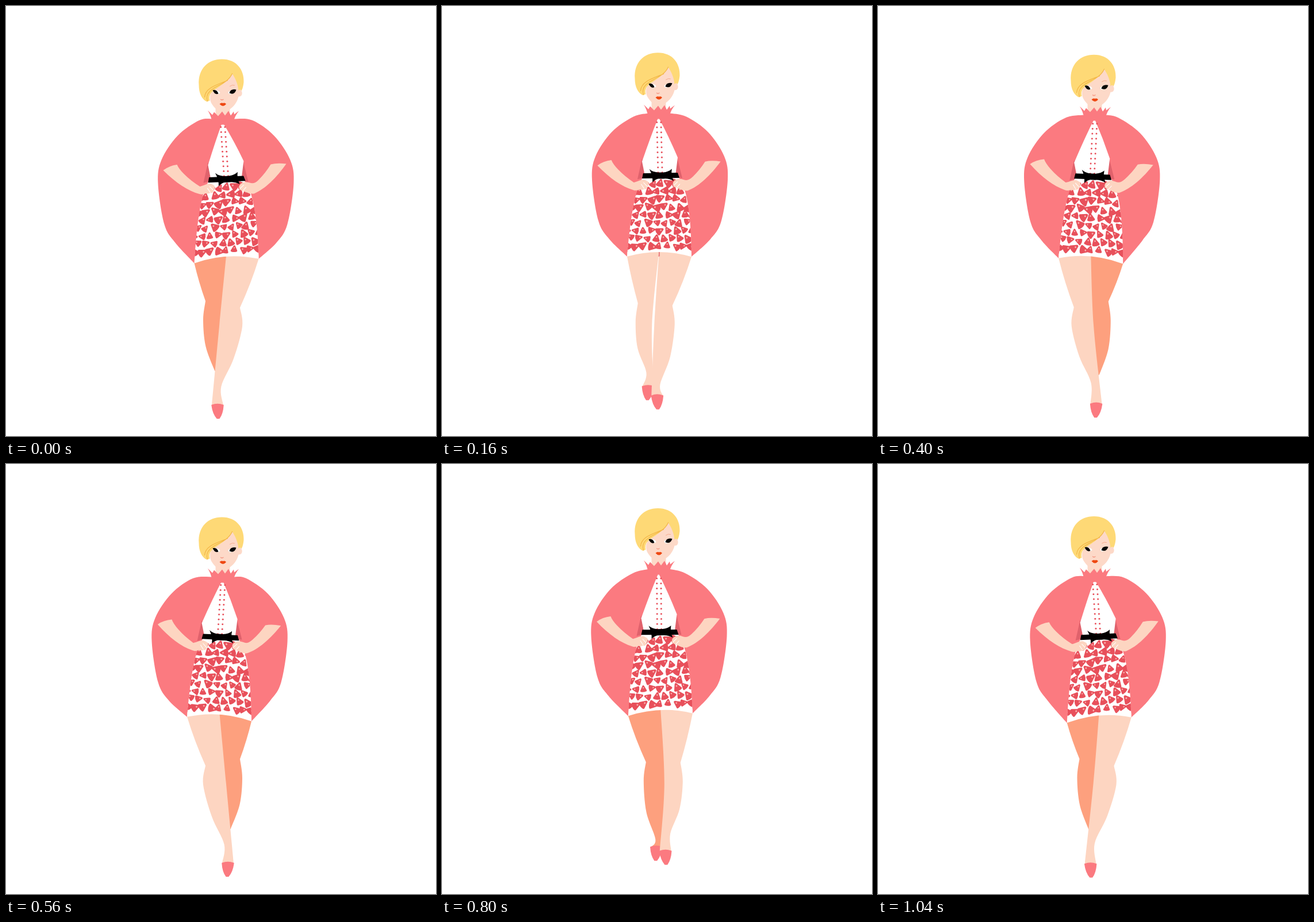
Recreate the animation shown at these times as an HTML page with a canvas. Size 748x748 px, loop 1120 ms.

```html
<!DOCTYPE html>
<html lang="en">
<head>
<meta charset="utf-8">
<title>Catwalk</title>
<style>
html, body { margin: 0; width: 100%; height: 100%; overflow: hidden; background: #fff; }
canvas { display: block; width: 748px; height: 748px; }
</style>
</head>
<body>
<canvas id="stage" width="748" height="748"></canvas>
<script>
const c = document.getElementById('stage').getContext('2d');
const STEP = 80, COUNT = 14, HALF = COUNT / 2;
const AXIS = 377; // the two legs mirror each other about this line, half a cycle apart
const PINK = '#fb7a80', SHADE = '#e0626c', RED = '#e8505b', SKIN = '#fdd5c1',
  DARK = '#fda07e', FACE = '#fdd9c8', HAIR = '#fed976', STRAND = '#f3b648';

const HEAD = {
  hair: new Path2D('M336 138C334 110 352 93 376 93C402 93 415 112 414 133C413 142 411 148 408 150L394 152L357 152Q353 158 355 165L350 167C341 163 336 152 336 138Z'),
  face: new Path2D('M394 118C387 134 368 141 358 151C354 156 355 164 358 170C363 178 370 185 378 185C390 183 402 172 405 158C410 159 413 153 410 148C409 145 406 146 405 148C404 135 399 126 394 118Z'),
  neck: new Path2D('M365 172H390V197H365Z'),
  strands: new Path2D('M394 118C386 136 365 138 355 149C350 154 349 160 351 166M386 130C366 138 347 143 346 159'),
  whites: new Path2D('M366 147Q373 148 373 152L369 154ZM387 150L393 147L392 154Q387 154 387 150Z'),
  eyes: new Path2D('M360 147Q367 145 370 153Q364 156 360 147ZM389 152Q391 144 401 146Q398 156 389 152Z'),
  brow: new Path2D('M390 140Q394 137 398 138.5'),
  nose: new Path2D('M374 163Q376 165 378.5 163'),
  lips: new Path2D('M372 171Q375 168 378 169.5Q381 168 383.5 171Q378 178 372 171Z')
};
const COLLAR = new Path2D('M-27-11L-19-3L-16-8L-9-1L-2-9L3-2L9-10L13-2L18-9L19-4L27-10Q20-1 18 8L10 14H-12L-20 8Q-21-1-27-11Z');
const BELT = new Path2D('M-30-5H30L33 4H-32Z');
const BOW = new Path2D('M-19-12Q-14-7-4-6H5Q15-7 20-12Q18-1 23 9Q14 4 5 5H-4Q-9 6-14 11Q-13 0-19-12Z');
const ARMS = new Path2D(
  'M274 286Q284 278 298 276Q301 283 310 292Q322 304 338 314C346 312 350 308 357 309L363 312Q365 316 362 320Q361 326 357 325Q352 327 348 326Q342 329 337 327C318 322 296 308 274 286Z' +
  'M488 274Q472 272 461 275Q452 290 440 302C434 308 430 309 424 307Q414 304 409 309Q404 313 407 319Q412 322 417 323Q424 327 432 326C452 318 472 297 488 274Z');
const FINGERS = new Path2D('M351 317L356 324M355 314L361 320M418 315L413 321M414 311L408 317');
// Right half of the cape, measured from the belt.
const CAPE = [[46, -103], [84, -76], [112, -34], [118, 7], [107, 78], [88, 110]];

const mix = (a, b, t) => a + (b - a) * t;
const noise = n => { const v = Math.sin(n * 12.9898) * 43758.5453; return v - Math.floor(v); };
// One sway per loop, and one bounce per footfall; peak is the step of the maximum.
const sway = (step, amp, peak) => amp * Math.cos((step - peak) / COUNT * 2 * Math.PI);
const bounce = (step, amp, peak) => amp * Math.cos((step - peak) / HALF * 2 * Math.PI);

function fill(path, color) { c.fillStyle = color; c.fill(path); }
function line(path, color, width) {
  c.strokeStyle = color; c.lineWidth = width; c.lineCap = c.lineJoin = 'round'; c.stroke(path);
}
function polygon(points, color) {
  const p = new Path2D();
  points.forEach(q => p.lineTo(...q));
  fill(p, color);
}
function disc(x, y, r, color) {
  const p = new Path2D();
  p.arc(x, y, r, 0, 7);
  fill(p, color);
}
// Smooth curve through all points, the pen being at the first.
function curve(p, pts) {
  for (let i = 0; i < pts.length - 1; i++) {
    const a = pts[Math.max(i - 1, 0)], b = pts[i], d = pts[i + 1], e = pts[Math.min(i + 2, pts.length - 1)];
    p.bezierCurveTo(b[0] + (d[0] - a[0]) / 6, b[1] + (d[1] - a[1]) / 6,
      d[0] - (e[0] - b[0]) / 6, d[1] - (e[1] - b[1]) / 6, d[0], d[1]);
  }
}
function group(draw) { c.save(); draw(); c.restore(); }

function drawCape([x, y], hemL, hemR, collar) {
  const p = new Path2D();
  const side = s => [[collar[0] + s * 17, collar[1] + 4], ...CAPE.map(([u, v]) => [x - 1 + s * u, y + v])];
  const left = [...side(-1), hemL], right = [...side(1), hemR].reverse();
  p.moveTo(...left[0]);
  curve(p, left);
  p.lineTo(...hemR);
  curve(p, right);
  fill(p, PINK);
}

// Left leg; the right one is drawn mirrored, half a cycle later.
function drawLeg(step, hip, mid, color) {
  const knee = [347 + sway(step, -8, 3.5), 519 + sway(step, 6, 6.3)];
  const shin = [368 + sway(step, 10, 8.3) + bounce(step, 4, 6.3), 648 + sway(step, 14, 7.3)];
  const toe = [368 + sway(step, 17, 7), 694 + sway(step, 26, 6.2)];
  const calf = [knee[0] - 4, knee[1] + 33];
  const low = [mix(knee[0], shin[0], .65) - 10, mix(knee[1], shin[1], .65)];
  const innerKnee = [375 + sway(step, 10, 8.5) + (color === DARK ? 12 : 0), 555];
  const lifted = sway(step, 1, 12.7) > .6;
  const outer = lifted ? shin : [toe[0] - 9, toe[1] - 24];
  const inner = lifted ? [shin[0] + 12, shin[1] + 10] : [toe[0] + 11, toe[1] - 24];
  const top = [mid[0], mid[1] - 6];

  const p = new Path2D();
  p.moveTo(...top);
  p.lineTo(hip[0], hip[1] - 8);
  p.lineTo(...hip);
  p.quadraticCurveTo(mix(hip[0], knee[0], .4), mix(hip[1], knee[1], .5), ...knee);
  curve(p, lifted ? [knee, calf, low, shin] : [knee, calf, low, shin, outer]);
  p.lineTo(...inner);
  curve(p, [inner, innerKnee, top]);
  fill(p, color);
  if (lifted) return;

  const shoe = new Path2D();
  shoe.moveTo(...outer);
  shoe.quadraticCurveTo(toe[0] + 1, outer[1] - 4, ...inner);
  shoe.quadraticCurveTo(toe[0] + 9, toe[1] - 9, toe[0] + 2, toe[1] - 1);
  shoe.lineTo(toe[0] - 2, toe[1] - 1);
  shoe.quadraticCurveTo(toe[0] - 8, toe[1] - 9, ...outer);
  fill(shoe, PINK);
  line(shoe, PINK, 1.4);
}

function drawLegs(step, hemL, hemR, mid) {
  const flip = ([x, y]) => [2 * AXIS - x, y];
  const passing = step % HALF === 2, leftFront = step > 2 && step < 10;
  const tone = front => front || passing ? SKIN : DARK;
  const left = () => drawLeg(step, hemL, mid, tone(leftFront));
  const right = () => group(() => {
    c.translate(2 * AXIS, 0);
    c.scale(-1, 1);
    drawLeg((step + HALF) % COUNT, flip(hemR), flip(mid), tone(!leftFront));
  });
  (leftFront ? [right, left] : [left, right]).forEach(leg => leg());
  if (passing) line(new Path2D(`M${mid[0]} ${mid[1]}v7`), SHADE, 1.4);
}

function drawShirt([ax, ay], [x, y]) {
  polygon([[x - 32, y - 30], [x - 40, y + 6], [x - 25, y + 2]], SHADE);
  polygon([[x + 29, y - 32], [x + 38, y + 4], [x + 24, y + 2]], SHADE);
  const p = new Path2D();
  p.moveTo(ax, ay);
  p.quadraticCurveTo(mix(ax, x - 32, .48), mix(ay, y - 25, .44), x - 32, y - 25);
  p.lineTo(x - 27, y);
  p.lineTo(x + 26, y);
  p.lineTo(x + 30, y - 32);
  p.quadraticCurveTo(mix(ax, x + 30, .56), mix(ay, y - 32, .5), ax, ay);
  fill(p, '#fff');
  for (let i = 0; i < 11; i++) for (const side of [-3.6, 3.6])
    disc(mix(ax + .8, x - .5, i / 10) + side, mix(ay + 9, y - 6, i / 10), 1.5, RED);
}

// Jittered rows of rounded triangles, sheared along with waist and hem.
function drawSeeds([x, y], l, r) {
  c.transform((r[0] - l[0]) / 111, (r[1] - l[1]) / 111,
    ((l[0] + r[0]) / 2 - x) / 143, ((l[1] + r[1]) / 2 - y) / 143, x, y);
  for (let row = 0; row < 9; row++) for (let col = -5; col < 6; col++) {
    const n = row * 11 + col + 9, size = .95 + noise(n) * .35;
    group(() => {
      c.translate((col + (row % 2) / 2) * 14 + noise(n + 200) * 4 - 2, 13 + row * 13.8 + noise(n + 400) * 4 - 2);
      c.rotate((noise(n + 600) - .5) * 3.6);
      c.scale(size, size);
      const tri = new Path2D('M0-4.8L4.2 3.4Q0 4.8-4.2 3.4Z');
      fill(tri, RED);
      line(tri, RED, 3.4);
      disc(0, -2, 1.2, '#f8aeab');
    });
  }
}

function drawSkirt(belt, l, r, mid) {
  const [x, y] = belt, p = new Path2D();
  p.moveTo(x - 30, y + 2);
  p.quadraticCurveTo(x - 49, y + 28, ...l);
  p.quadraticCurveTo(mid[0], 2 * mid[1] - (l[1] + r[1]) / 2, ...r);
  p.quadraticCurveTo(x + 53, y + 27, x + 31, y + 2);
  p.closePath();
  fill(p, '#fff');
  group(() => { c.clip(p); drawSeeds(belt, l, r); });
}

// Belt and arms turn with the hips.
function drawHips(belt, tilt) {
  group(() => {
    c.translate(...belt);
    c.rotate(tilt);
    fill(BELT, '#000');
    fill(BOW, '#000');
  });
  group(() => {
    c.translate(...belt);
    c.rotate(tilt * .7 + .035);
    c.translate(-384, -301.5);
    fill(ARMS, SKIN);
    line(FINGERS, '#fff', 1);
  });
}

function drawHead(lift) {
  group(() => {
    c.translate(-.5, lift);
    fill(HEAD.neck, FACE);
    fill(HEAD.hair, HAIR);
    fill(HEAD.face, FACE);
    line(HEAD.strands, STRAND, 1.2);
    fill(HEAD.whites, '#fff');
    fill(HEAD.eyes, '#050505');
    line(HEAD.brow, '#f5ab8e', 1);
    line(HEAD.nose, '#f59a86', 1.3);
    fill(HEAD.lips, '#ee4812');
  });
}

function draw(step) {
  const lift = -8.3 + bounce(step, 8, 6.75);
  const collar = [378, 193 + lift * .9], apex = [376.5, 202 + lift * .75];
  const belt = [378 + sway(step, 5.7, 13.3), 302 + lift * .55];
  const tilt = sway(step, .047, 6.3);
  const hemX = 377.3 + sway(step, 7.5, 12.7), hemY = 440.5 + bounce(step, 5, 6);
  const drop = sway(step, 5, 12.4);
  const hemL = [hemX - 56, hemY + drop], hemR = [hemX + 56, hemY - drop];
  const mid = [hemX, hemY - 8];

  c.fillStyle = '#fff';
  c.fillRect(0, 0, 748, 748);
  drawCape(belt, hemL, hemR, collar);
  drawLegs(step, hemL, hemR, mid);
  drawShirt(apex, belt);
  drawSkirt(belt, hemL, hemR, mid);
  drawHips(belt, tilt);
  drawHead(lift);
  group(() => { c.translate(...collar); fill(COLLAR, PINK); });
}

let shown = -1;
const start = performance.now();
function tick() {
  const step = Math.floor((performance.now() - start) / STEP) % COUNT;
  if (step !== shown) draw(shown = step);
  requestAnimationFrame(tick);
}
tick();
</script>
</body>
</html>
```
